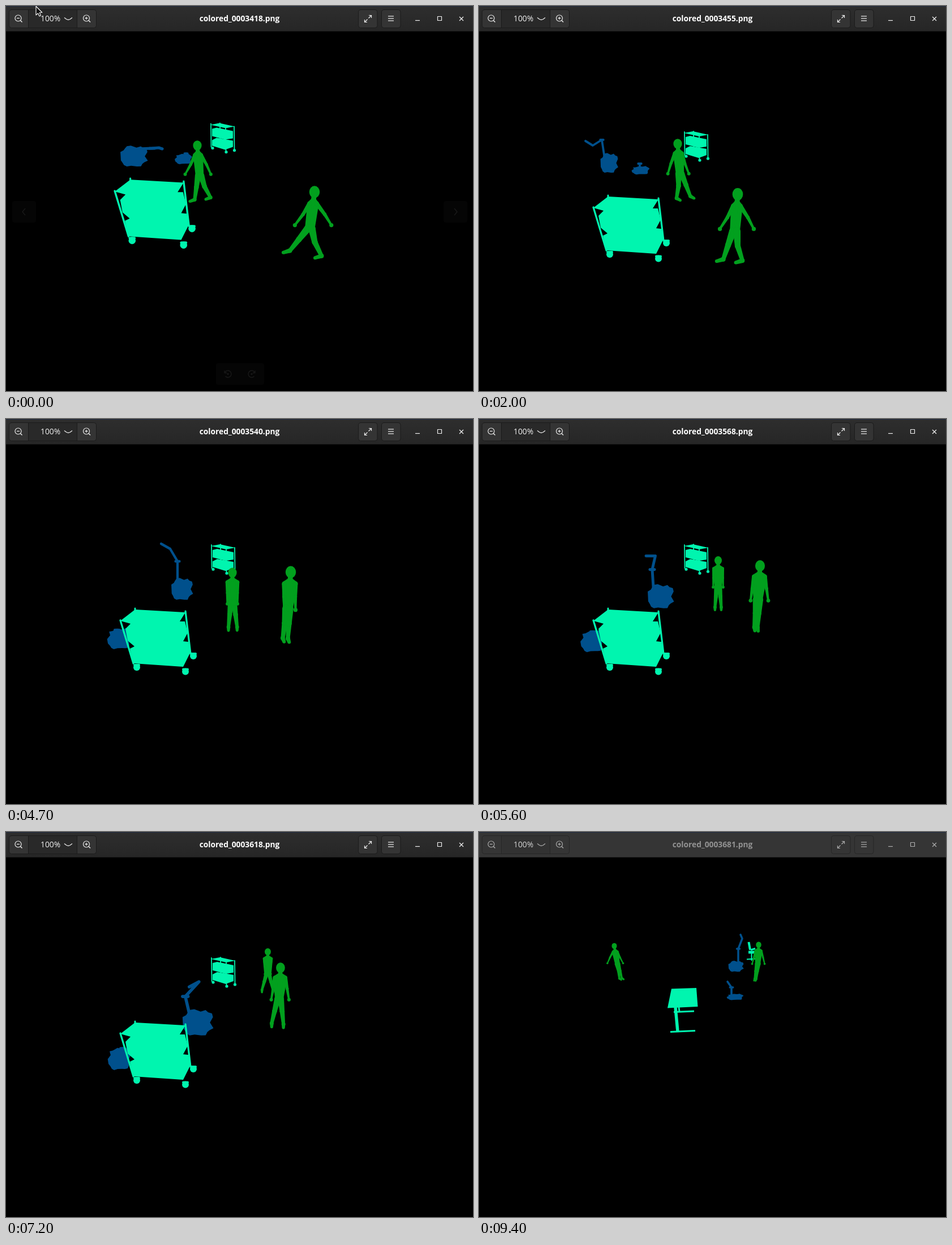
Write an HTML page with a canvas that moves like this. It is 825 by 679 pixels and loops after 9.5 s.

```html
<!DOCTYPE html>
<html lang="en">
<head>
<meta charset="utf-8">
<title>Image viewer</title>
<style>
html, body { margin: 0; width: 825px; height: 679px; overflow: hidden; background: #000; }
canvas { display: block; position: absolute; left: 0; top: 0; }
div { position: absolute; top: 0; white-space: nowrap;
  font: 13.8px/44px "Open Sans", "Noto Sans", sans-serif; }
#name { left: 0; width: 825px; text-align: center; font-weight: 700; }
#zoom { left: 61px; }
</style>
</head>
<body>
<canvas id="stage" width="825" height="679"></canvas>
<div id="name"></div>
<div id="zoom">100%</div>
<script>
const c = document.getElementById('stage').getContext('2d');
const nameBox = document.getElementById('name');
const zoomBox = document.getElementById('zoom');
const LOOP = 9500, STEP = 100, CUT = 7600, START = 818, END = 9244;
const CYAN = '#00f5af', GREEN = '#02a01e', BLUE = '#00508c';
const TAU = Math.PI * 2;
const clamp = (v, a = 0, b = 1) => Math.min(b, Math.max(a, v));
const mix = (a, b, u) => a + (b - a) * u;
const mid = (p, q, dx = 0) => [(p[0] + q[0]) / 2 + dx, (p[1] + q[1]) / 2];
// End of a limb that hangs at an angle from straight down
const hang = (p, len, ang) => [p[0] + len * Math.sin(ang), p[1] + len * Math.cos(ang)];

function trace(p, close) {
  c.beginPath();
  for (let i = 0; i < p.length; i += 2) c.lineTo(p[i], p[i + 1]);
  if (close) c.closePath();
}
function poly(...p) { trace(p, true); c.fill(); }
function line(w, ...p) { c.lineWidth = w; trace(p); c.stroke(); }
function dot(x, y, rx, ry = rx) {
  c.beginPath();
  c.ellipse(x, y, rx, ry, 0, 0, TAU);
  c.fill();
}
function ink(color, cap = 'round') {
  c.fillStyle = c.strokeStyle = color;
  c.lineCap = cap;
  c.lineJoin = 'round';
}
function random(seed) {
  return () => (seed = (seed * 16807) % 2147483647) / 2147483647;
}

// Limb that narrows from width a to width b
function taper(p, q, a, b) {
  const ang = Math.atan2(q[1] - p[1], q[0] - p[0]);
  const sx = -Math.sin(ang) / 2, sy = Math.cos(ang) / 2;
  poly(p[0] + sx * a, p[1] + sy * a, q[0] + sx * b, q[1] + sy * b,
       q[0] - sx * b, q[1] - sy * b, p[0] - sx * a, p[1] - sy * a);
  dot(...p, a / 2);
  dot(...q, b / 2);
}

// Every key starts with x, y, which keep drifting beyond the first and last key
class Actor {
  constructor(paint) { this.paint = paint; this.keys = []; }
  key(t, ...v) { this.keys.push({ t, v }); return this; }
  draw(t) {
    const k = this.keys;
    let i = 0;
    while (i < k.length - 2 && t > k[i + 1].t) i++;
    const a = k[i], b = k[i + 1], span = b.t - a.t;
    const u = (t - a.t) / span;
    const v = a.v.map((n, j) => mix(n, b.v[j], j < 2 ? u : clamp(u)));
    const steps = Math.max(1, Math.round(span / 1100));
    this.paint(v, Math.sin(TAU * steps * u));
  }
}

// Head x, y, height, lean, left and right leg angle, arm spread, facing (-1 left, 1 right)
function person([x, y, h, lean, legL, legR, arms, face], swing) {
  const s = h / 136;
  const half = h * (.08 - .035 * Math.abs(face));
  const neck = [x + lean * h * .2, y + h * .1];
  const chest = [x + lean * h * .3, y + h * .15];
  const hip = [x + lean * h, y + h * .47];
  ink(GREEN);
  dot(x, y, h * .068, h * .079);
  taper([x, y], neck, 8 * s, 9 * s);
  c.lineWidth = 8 * s;
  trace([...neck, chest[0] + half, chest[1], hip[0] + h * .035, hip[1],
         hip[0] - h * .035, hip[1], chest[0] - half, chest[1]], true);
  c.fill();
  c.stroke();
  for (const side of [-1, 1]) {
    const shoulder = [chest[0] + side * half, chest[1]];
    const hand = hang(shoulder, h * .34, side * (arms + swing * .12));
    const elbow = mid(shoulder, hand, -face * h * .01);
    taper(shoulder, elbow, 8 * s, 6 * s);
    taper(elbow, hand, 6 * s, 4 * s);
    dot(...hand, 3.6 * s);

    const ankle = hang(hip, h * .39, (side < 0 ? legL : legR) - side * swing * .2);
    const thigh = [hip[0] + side * h * .025, hip[1]];
    const trailing = side * face < 0;
    const knee = mid(thigh, ankle, trailing ? face * h * .025 : 0);
    const toe = [ankle[0] + face * h * .085, ankle[1] + h * (.055 - .03 * Math.abs(face))];
    taper(thigh, knee, 13 * s, 10 * s);
    taper(knee, ankle, 10 * s, 7 * s);
    taper(ankle, toe, 8 * s, 6 * s);
  }
}

// Body centre, width and height, then arm joints relative to the centre
const robot = seed => ([x, y, w, h, ...arm]) => {
  const rnd = random(seed);
  const bend = v => Math.sign(v) * Math.abs(v) ** .75;
  const body = [];
  for (let i = 0; i < 22; i++) {
    const a = i * TAU / 22, r = .4 + .14 * rnd();
    body.push(x + w * r * bend(Math.cos(a)), y + h * r * bend(Math.sin(a)));
  }
  const joints = arm.map((n, i) => n + (i % 2 ? y : x));
  const base = x + clamp(arm[0], -.28 * w, .28 * w);
  const thick = 1.5 + .075 * w, knob = .09 * w;
  ink(BLUE);
  poly(...body);
  line(thick, base, y - h * .35, ...joints);
  line(thick, joints[0] - knob, joints[1], joints[0] + knob, joints[1]);
};

const front = new Actor(person)
  .key(START, 545, 328, 136, -.06, -.73, .4, .6, -1)
  .key(2000, 457, 332, 138, -.036, -.39, .25, .53, -1)
  .key(3500, 425, 330, 138, -.01, -.48, .41, .05, -.6)
  .key(4700, 400, 271, 112, 0, -.16, .19, 0, 0)
  .key(6500, 445, 228, 80, 0, -.14, .1, .07, 0);

const back = new Actor(person)
  .key(START, 338, 246, 112, .036, -.2, .46, .47, -.9)
  .key(2000, 351, 243, 112, .036, -.14, .43, .33, .7)
  .key(3500, 483, 264, 126, -.015, -.28, .15, .08, .5)
  .key(4700, 503, 270, 136, -.037, -.17, 0, 0, .2)
  .key(6500, 490, 248, 116, -.02, -.1, -.03, .28, 0);

const walker = new Actor(person)
  .key(8200, 236, 196, 62, .058, -.06, .6, .4, .6)
  .key(END, 239, 201, 67, .083, .13, .3, .45, .6);

const visitor = new Actor(person)
  .key(8200, 512, 202, 75, -.02, -.2, -.1, .24, -.4)
  .key(END, 494, 199, 70, -.02, -.2, -.1, .25, -.2);

const crane = new Actor(robot(7))
  .key(START, 226, 265, 48, 38, 32, -14, 44, -15, 50, -13)
  .key(2000, 230, 277, 31, 36, -13, -41, -29, -31, -42, -39)
  .key(3500, 269, 277, 44, 34, -7, -43, -19, -50, -30, -54)
  .key(4700, 311, 300, 38, 40, -8, -49, -21, -71, -37, -80)
  .key(6500, 331, 326, 54, 48, -22, -46, 2, -72, -15, -63);

const rover = new Actor(robot(23))
  .key(START, 314, 270, 30, 20, 4, -10)
  .key(2000, 286, 290, 31, 16, -2, -12)
  .key(3500, 237, 337, 40, 28, -3, -16)
  .key(4700, 201, 388, 42, 40, -5, -16)
  .key(6500, 201, 397, 40, 43, 5, -19);

const farCrane = new Actor(robot(7))
  .key(8200, 403, 237, 28, 21, -1, -30, 3, -50, 8, -51)
  .key(END, 454, 237, 27, 20, 4, -31, 11, -49, 8, -56);

const farRover = new Actor(robot(23))
  .key(8200, 523, 298, 28, 15, -3, -17, -11, -26)
  .key(END, 453, 291, 29, 12, -7, -17, -14, -27);

// The camera settles: u goes from 0 to 1
function bigCart(u) {
  c.save();
  c.translate(mix(-21.6, 0, u), mix(-48, 0, u));
  c.scale(mix(1.058, 1, u), mix(1.054, 1, u));
  ink(CYAN);
  const right = [], left = [];
  for (const k of [0, 1]) {
    right.push(307 + 6 * k, 357 + 35 * k, 316 + 6 * k, 357 + 36 * k, 321 + 5 * k, 377 + 34 * k);
    left.push(219 - 8 * k, 405 - 35 * k, 227 - 7 * k, 401 - 40 * k, 215 - 13 * k, 391 - 35 * k);
  }
  poly(228, 336, 317, 341, ...right, 313, 437, 225, 431, ...left);
  line(3.2, 202, 355, 225, 431);
  line(3.2, 317, 339, 326, 414);
  line(3, 228, 334, 228, 339);
  for (const [x, y] of [[231, 438], [317, 445.5], [331, 418]]) {
    dot(x, y, 6);
    line(4, x - 4, y - 4, x + 4, y - 4);
  }
  c.restore();
}

function smallCart(u) {
  c.save();
  c.translate(mix(-1, 0, u), mix(-14.5, 0, u));
  ink(CYAN);
  poly(362, 224, 378, 221, 405, 227, 389, 230);
  for (const k of [0, 1])
    poly(365, 231 + 20 * k, 373, 229 + 18 * k, 402, 235 + 17 * k,
         402, 248 + 15 * k, 388, 250 + 18 * k, 365, 244 + 17 * k);
  for (const [x, y] of [[363, 222], [404, 227], [389, 230], [379, 221]])
    line(1.8, x, y, x + .5, y + 41);
  for (const [x, y] of [[366, 265], [390, 272], [404.5, 269]]) dot(x, y, 2.6);
  c.restore();
}

function table() {
  ink(CYAN, 'butt');
  poly(340, 276.5, 384, 275, 386.5, 308, 333, 310.5);
  line(5.5, 347, 309, 351, 352);
  line(3, 353, 309, 354, 317);
  line(3, 344, 317.5, 380, 316);
  line(3, 338, 352.5, 382, 350.5);
}

function chair() {
  ink(CYAN, 'butt');
  line(4, 476.5, 194, 479, 208);
  line(3, 480, 208, 488, 205.5);
  line(5, 476, 212, 490, 212);
  line(2, 481.5, 213, 481.5, 227);
  line(2, 473, 224.5, 491, 223.5);
}

function box(x, y, w, h, r, fill, edge) {
  c.beginPath();
  c.roundRect(x, y, w, h, r);
  c.fillStyle = fill;
  c.fill();
  if (!edge) return;
  c.strokeStyle = edge;
  c.lineWidth = 1;
  c.stroke();
}

function lens(x, plus) {
  c.beginPath();
  c.arc(x, 21.5, 5.5, 0, TAU);
  c.stroke();
  line(1.4, x + 4, 25.5, x + 7, 28.5);
  line(1.2, x - 2.5, 21.5, x + 2.5, 21.5);
  if (plus) line(1.2, x, 19, x, 24);
}

function header(dim) {
  const grey = (a, b) => { const g = Math.round(mix(a, b, dim)); return `rgb(${g},${g},${g})`; };
  const bg = c.createLinearGradient(0, 0, 0, 44);
  bg.addColorStop(0, grey(46, 53));
  bg.addColorStop(1, grey(38, 53));
  c.fillStyle = bg;
  c.fillRect(0, 0, 825, 44);
  c.fillStyle = '#202a40';
  c.fillRect(0, 0, 825, 1);
  c.fillStyle = grey(24, 34);
  c.fillRect(0, 44, 825, 1);

  const face = grey(52, 53), edge = grey(27, 38);
  box(5.5, 6.5, 154, 32, 4, face, edge);
  c.fillStyle = grey(41, 50);
  c.fillRect(40, 7, 86, 31);
  c.fillStyle = edge;
  for (const x of [39, 125]) c.fillRect(x, 7, 1, 31);
  for (const x of [622.5, 663.5]) box(x, 6.5, 33.5, 32, 4, face, edge);

  ink(grey(238, 172), 'butt');
  c.lineWidth = 1.2;
  lens(21.5, false);
  lens(142, true);
  line(1.2, 103, 20.5, 107, 23.5, 110, 24.3, 113, 23.5, 117, 20.5);
  for (const d of [-1, 1]) {
    const x = 639.5 + 6 * d, y = 22.5 - 6 * d;
    line(1.2, x - 4.5 * d, y, x, y, x, y + 4.5 * d);
    line(1.2, x, y, x - 5 * d, y + 5 * d);
    line(1.2, 804.5 - 3.5 * d, 19, 804.5 + 3.5 * d, 26);
  }
  for (const y of [18, 22, 26]) line(1.2, 675, y, 685, y);
  line(1.2, 723, 25.5, 731, 25.5);
  c.strokeRect(762.5, 18.5, 7, 7);

  nameBox.style.color = grey(255, 146);
  zoomBox.style.color = grey(240, 212);
}

function overlay(alpha) {
  c.save();
  c.globalAlpha = alpha;
  for (const [x, y, w] of [[11, 344, 42], [773, 344, 42], [371, 630, 85]])
    box(x, y, w, 38, 4, '#050505');
  ink('#1a1a1a', 'butt');
  for (const d of [-1, 1]) {
    const side = 413 + 381.5 * d, turn = 413 + 21 * d;
    line(1.3, side - 2.5 * d, 357, side + 2.5 * d, 363, side - 2.5 * d, 369);
    c.beginPath();
    c.arc(turn, 649, 6, d < 0 ? -2.6 : -.54, d < 0 ? 2.4 : .74 - TAU, d > 0);
    c.stroke();
    line(1.3, turn + 6 * d, 643, turn + 6 * d, 647, turn + 2 * d, 647);
    dot(turn, 649, 1.6);
  }
  c.restore();
}

function cursor(x, y) {
  c.save();
  c.translate(x, y);
  trace([0, 0, 0, 15.5, 3.5, 12.3, 6, 17.5, 8.5, 16.3, 6.2, 11.3, 10.8, 11], true);
  c.fillStyle = '#111';
  c.strokeStyle = '#fff';
  c.lineWidth = 1.1;
  c.fill();
  c.stroke();
  c.restore();
}

function render(ms) {
  const now = Math.floor(ms / STEP) * STEP;
  const t = clamp(now, START, END);
  c.fillStyle = '#000';
  c.fillRect(0, 0, 825, 679);
  if (now < CUT) {
    const settle = clamp((t - START) / (1800 - START));
    smallCart(settle);
    for (const a of [crane, rover, back]) a.draw(t);
    bigCart(settle);
    front.draw(t);
  } else {
    table();
    chair();
    for (const a of [farCrane, farRover, walker, visitor]) a.draw(t);
  }
  if (now < 400) overlay(1 - now / 400);
  header(clamp((now - 9200) / 200));
  if (now < 200) cursor(53 - now * .07, .5 - now * .06);
  const num = clamp(3455 + Math.round((now - 2000) * .0313), 3418, 3681);
  nameBox.textContent = `colored_000${num}.png`;
}

function tick() {
  render(performance.now() % LOOP);
  requestAnimationFrame(tick);
}
tick();
</script>
</body>
</html>
```
